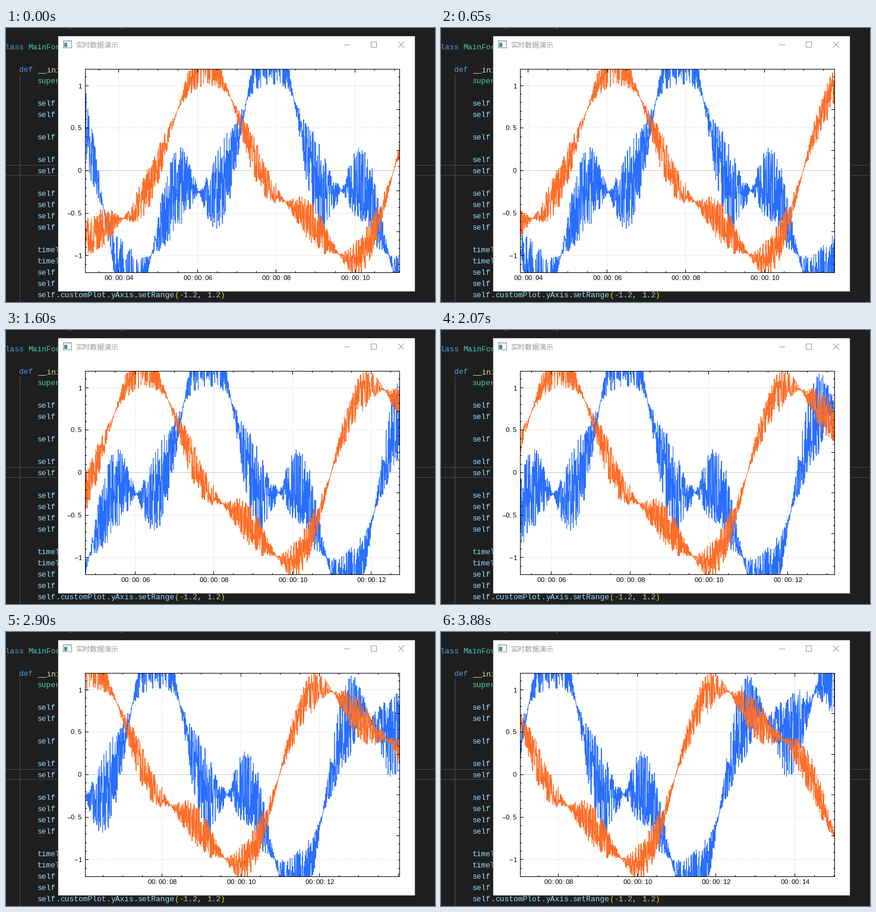
Write a matplotlib script that moves like this. It is 722x462 px and loops after 3.91 s.

```python
import numpy as np
import matplotlib.pyplot as plt
from matplotlib.animation import FuncAnimation
from matplotlib.patches import Rectangle

plt.rcParams["path.snap"] = False

W, H, DPI = 722, 462, 64
PX = 72 / DPI                       # points per pixel
LEFT, RIGHT, TOP, BOTTOM = 133.5, 662.5, 69.5, 412.5
X_SCALE, Y_SCALE = 530 / 8, 344 / 2.4   # pixels per second and per unit
SPAN = 8                            # seconds shown
START = 11.152                      # clock at the right edge when the loop begins
FRAMES, INTERVAL = 170, 23
LABEL_LIMIT = 675                   # labels reaching past this are hidden
BLUE, ORANGE = "#286eff", "#ff6e28"

fig = plt.figure(figsize=(W / DPI, H / DPI), dpi=DPI, facecolor="#1e1e1e")
ax = fig.add_axes([0, 0, 1, 1])
ax.set_xlim(0, W)
ax.set_ylim(H, 0)
ax.axis("off")


def box(x, y, w, h, color, z):
    patch = Rectangle((x, y), w, h, facecolor=color, edgecolor="none", zorder=z)
    ax.add_patch(patch)
    return patch


def line(xs, ys, color, z, **kw):
    return ax.plot(xs, ys, color=color, lw=PX, zorder=z,
                   solid_capstyle="butt", solid_joinstyle="bevel", **kw)[0]


def text(x, y, s, size, color, font, z, ha="left"):
    return ax.text(x, y, s, fontsize=size * PX, color=color, family=font,
                   ha=ha, va="baseline", zorder=z)


def segments(parts):
    """Join (x0, y0, x1, y1) parts into one broken line."""
    xs, ys = [], []
    for x0, y0, x1, y1 in parts:
        xs += [x0, x1, np.nan]
        ys += [y0, y1, np.nan]
    return xs, ys


# Code editor behind the window
KEYWORD, TYPE, FUNC, VAR = "#569cd6", "#4ec9b0", "#dcdcaa", "#9cdcfe"
PLAIN, NUMBER, BRACKET = "#d4d4d4", "#b5cea8", "#ffd700"
CHAR = 7.7


def code(column, y, *parts):
    x = -8.7 + column * CHAR
    for s, color in parts:
        text(x, y, s, 12.83, color, "Liberation Mono", 2)
        x += len(s) * CHAR


box(0, 231, W, 1, "#474747", 1)
box(0, 248, W, 1, "#474747", 1)
box(23, 79, 1, H - 79, "#505050", 1)
code(15, -2, ("p_  ,      )", PLAIN))
code(0, 36, ("class ", KEYWORD), ("MainForm", TYPE))
code(4, 74, ("def ", KEYWORD), ("__init", FUNC))
code(8, 93, ("super", TYPE))
for row in (126, 145, 183, 221, 240, 278, 297, 316, 335, 411, 430):
    code(8, row + 5, ("self", VAR), (".", PLAIN))
for row in (373, 392):
    code(8, row + 5, ("timeT", VAR))
code(8, 454, ("self", VAR), (".", PLAIN), ("customPlot", VAR), (".", PLAIN),
     ("yAxis", VAR), (".", PLAIN), ("setRange", VAR), ("(", BRACKET),
     ("-1.2", NUMBER), (", ", PLAIN), ("1.2", NUMBER), (")", BRACKET))

# Window with title bar
box(87, 13, 602, 432, "#444444", 3)
box(88, 14, 600, 430, "#ffffff", 3)
box(96, 21, 15, 13, "#8d9499", 4)
box(97, 22, 13, 2, "#dfe5e8", 5)
box(97, 24, 13, 9, "#f4f6f7", 5)
box(98, 25, 5, 7, "#3f8f9b", 6)
text(117, 33, "实时数据演示", 12, "#999999", "Noto Sans CJK JP", 4)
GREY = "#999999"
line([569, 579], [28.5, 28.5], GREY, 4)
line([614.5, 623.5, 623.5, 614.5, 614.5], [23.5, 23.5, 32.5, 32.5, 23.5], GREY, 4)
line([660, 670], [23, 33], GREY, 4)
line([660, 670], [33, 23], GREY, 4)


# Plot frame, vertical scales and grid
def y_pixel(v):
    return BOTTOM - (v + 1.2) * Y_SCALE


def crisp(v):
    return np.floor(v + 1e-6) + 0.5


def cells(x, y, s):
    """Text set on a fixed six pixel pitch."""
    return [text(x + 6 * i + 3, y, c, 11.2, "black", "Liberation Sans", 9, "center")
            for i, c in enumerate(s)]


line([LEFT, RIGHT, RIGHT, LEFT, LEFT], [TOP, TOP, BOTTOM, BOTTOM, TOP], "black", 8)
side_ticks = []
for i in range(-11, 12):
    y = crisp(y_pixel(i / 10))
    side_ticks.append((LEFT, y, LEFT + (2.5 if i % 5 else 5.5), y))
for i in range(1, 25):
    y = crisp(BOTTOM - i * 344 / 25)
    side_ticks.append((RIGHT, y, RIGHT - (2.5 if i % 5 else 5.5), y))
line(*segments(side_ticks), "black", 8)

DOTS = (0, (1, 2))
GRID = "#c8c8c8"
for v, label in ((1, "1"), (0.5, "0.5"), (0, "0"), (-0.5, "−0.5"), (-1, "−1")):
    y = crisp(y_pixel(v))
    line([134, 662], [y, y], GRID, 4, ls=DOTS if v else "-", dash_capstyle="butt")
    cells(127 - 6 * len(label), y + 4, label)

# Noisy samples of both signals
rng = np.random.default_rng(7)
keys = 2.9 + np.cumsum(rng.uniform(0.003, 0.007, 2520))
blue_y = y_pixel(np.sin(keys) + rng.random(keys.size) * np.sin(keys / 0.3843))
orange_y = y_pixel(np.cos(keys) + rng.random(keys.size) * 0.5 * np.sin(keys / 0.4364))

clip = box(LEFT, TOP, RIGHT - LEFT, BOTTOM - TOP, "none", 4)
graphs = []
for ys, color, z in ((blue_y, BLUE, 6), (orange_y, ORANGE, 7)):
    graph = line([], [], color, z)
    graph.set_clip_path(clip)
    graphs.append((graph, ys))

time_grid = line([], [], GRID, 4, ls=DOTS, dash_capstyle="butt")
time_ticks = line([], [], "black", 8)
labels = [cells(0, 425, "00:00:00") for _ in range(5)]

# Moments at which the picture is refreshed, in ms: first, last, count
BURSTS = ((50, 570, 12), (600, 1120, 12), (1170, 1680, 12), (1730, 2250, 12),
          (2300, 2870, 13), (2900, 3370, 11), (3420, 3880, 11))
refresh = np.concatenate([[0]] + [np.linspace(*b) for b in BURSTS])


def update(n):
    latest = np.searchsorted(refresh, (n + 1) * INTERVAL) - 1
    key = START + refresh[latest] / 1000

    def x_pixel(t):
        return LEFT + (t - key + SPAN) * X_SCALE

    shown = (keys > key - SPAN - 0.1) & (keys < key + 0.03)
    xs = x_pixel(keys[shown])
    for graph, ys in graphs:
        graph.set_data(xs, ys[shown])

    ticks, grid, marks = [], [], []
    for half in range(int(np.ceil((key - SPAN) * 2)), int(key * 2) + 1):
        x = crisp(x_pixel(half / 2))
        major = half % 4 == 0
        size = 5.5 if major else 2.5
        ticks += [(x, TOP, x, TOP + size), (x, BOTTOM, x, BOTTOM - size)]
        if major:
            grid.append((x, 412, x, 70))
            if x + 24 < LABEL_LIMIT:
                marks.append((x, f"00:00:{half // 2:02d}"))
    time_ticks.set_data(*segments(ticks))
    time_grid.set_data(*segments(grid))

    for i, chars in enumerate(labels):
        for j, char in enumerate(chars):
            char.set_visible(i < len(marks))
            if i < len(marks):
                char.set_x(marks[i][0] - 21 + 6 * j)
                char.set_text(marks[i][1][j])
    return []


anim = FuncAnimation(fig, update, frames=FRAMES, interval=INTERVAL,
                     init_func=lambda: update(0), repeat=True, repeat_delay=0,
                     blit=False)
plt.show()
```
